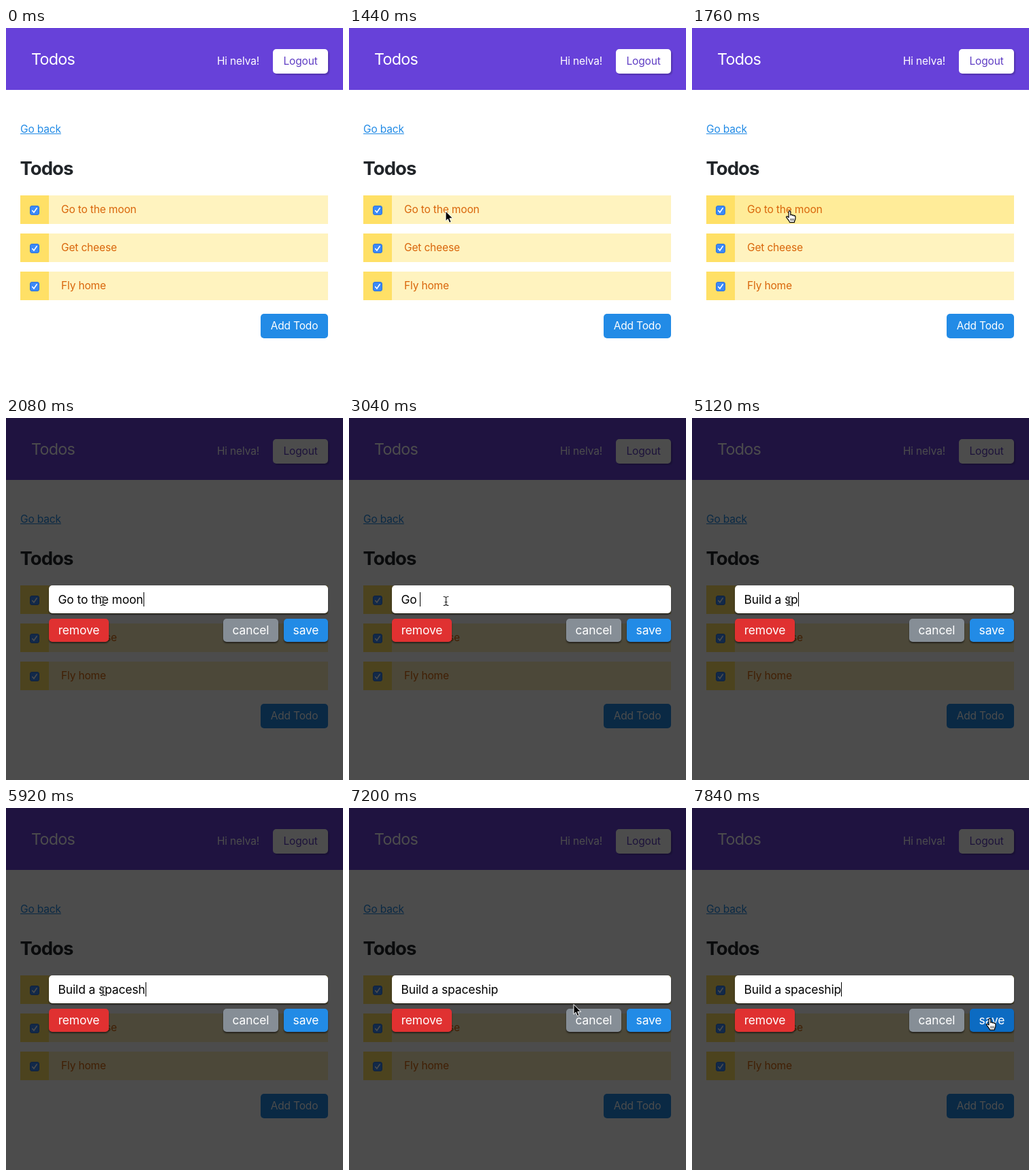
Animation, 495 px wide and 532 px high, one loop 8 s. Source, as an HTML page:

```html
<!DOCTYPE html>
<html lang="en">
<head>
<meta charset="utf-8">
<title>Todos</title>
<style>
  html, body { margin: 0; width: 100%; height: 100%; overflow: hidden; }
  body {
    position: relative; background: #fff; color: #212529;
    font: 15.5px Inter, sans-serif; font-optical-sizing: none;
    letter-spacing: -.01em; white-space: pre;
  }
  body > *, .row > *, #modal > * { position: absolute; box-sizing: border-box; }
  header { left: 0; top: 0; width: 100%; height: 91px; background: #6741d9; }
  .brand { left: 37px; top: 31px; font-size: 23.3px; line-height: 30px; letter-spacing: -.032em; color: #fff; }
  .greeting { right: 123px; top: 38px; line-height: 21px; color: #fff; }
  .button { border-radius: 5px; color: #fff; text-align: center; }
  .logout { left: 392px; top: 31px; width: 81px; height: 36px; line-height: 36px;
    background: #fff; color: #5f3dc4; box-shadow: 2px 2px 2px rgba(0,0,0,.2); }
  .add { left: 374px; top: 420px; width: 99px; height: 36px; line-height: 36px; background: #228be6; }
  .back { left: 21px; top: 138px; line-height: 21px; color: #228be6; text-decoration: underline; }
  h1 { left: 20.5px; top: 190px; margin: 0; font-size: 27.5px; line-height: 32px; letter-spacing: -.035em; }
  .row { left: 21px; width: 452px; height: 42px; line-height: 42px; color: #d9650a; }
  .fill { left: 42px; width: 410px; height: 42px; background: #fff3bf; }
  .cell { left: 0; width: 42px; height: 42px; background: #ffe066; }
  .check { left: 14px; top: 15px; width: 14px; height: 14px; }
  .label { left: 60px; top: 0; }
  .hover .fill { background: #ffec99; }

  #modal, #pointer { left: 0; top: 0; width: 100%; height: 100%; }
  #modal { background: rgba(0,0,0,.7); font-size: 17.4px; letter-spacing: -.006em; }
  #modal > * { border-radius: 5px; box-shadow: 0 2px 2px rgba(0,0,0,.5); }
  .input { left: 63px; top: 246px; width: 410px; height: 41px; padding-left: 13.5px;
    display: flex; align-items: center; background: #fff; color: #000; }
  #caret { width: 1px; height: 21px; background: #000; }
  #modal .button { top: 295px; height: 34px; line-height: 33px; }
  .remove { left: 63px; width: 88px; background: #e03131; }
  .cancel { left: 319px; width: 81px; background: #868e96; }
  #save { left: 408px; width: 65px; }
  #pointer g { stroke-linejoin: round; stroke-linecap: round; }
</style>
</head>
<body>
<header></header>
<div class="brand">Todos</div>
<div class="greeting">Hi nelva!</div>
<div class="button logout">Logout</div>
<div class="back">Go back</div>
<h1>Todos</h1>
<div class="button add">Add Todo</div>
<div id="modal"><div class="input"><span id="text"></span><i id="caret"></i></div><div class="button remove">remove</div><div class="button cancel">cancel</div><div class="button" id="save">save</div></div>
<svg id="pointer">
  <g id="arrow" fill="#000" stroke="#fff">
    <path d="M0 0V14.2L3.2 11.2 5.6 16.8 8.1 15.7 5.8 10.3H10.2Z"/>
  </g>
  <g id="hand" fill="#fff" stroke="#000" stroke-width="1.2">
    <path d="M4.5 10.5V2.2a1.4 1.4 0 0 1 2.8 0V7c.3-1.1 2.4-1 2.6.5 .4-.9 2.2-.7 2.4.6 .5-.7 2.1-.4 2.1 1.1V12c0 2-1.4 3-1.6 5.7H6C5.5 15 1.6 11.7 1 10 .6 8.4 2.8 8.2 4.5 10.5Z"/>
    <path d="M7.5 12.3v2.7M9.6 12.3v2.7M11.7 12.3v2.7" stroke-width=".8"/>
  </g>
  <g id="beam" fill="none">
    <path d="M-3.5-6.5Q0-6.5 0-4.5 0-6.5 3.5-6.5M0-4.5V4.5M-3.5 6.5Q0 6.5 0 4.5 0 6.5 3.5 6.5M-1.5 1.5H1.5" stroke="#fff" stroke-opacity=".7" stroke-width="2.4"/>
    <path d="M-3.5-6.5Q0-6.5 0-4.5 0-6.5 3.5-6.5M0-4.5V4.5M-3.5 6.5Q0 6.5 0 4.5 0 6.5 3.5 6.5M-1.5 1.5H1.5" stroke="#222" stroke-width="1.1"/>
  </g>
</svg>
<script>
const LOOP = 8000, STEP = 160, MODAL_OPENS = 2080;
const get = id => document.getElementById(id);

const rows = ['Go to the moon', 'Get cheese', 'Fly home'].map((label, i) => {
  const row = document.createElement('div');
  row.className = 'row';
  row.style.top = 246 + 56 * i + 'px';
  row.innerHTML = `<div class="fill"></div><div class="cell"></div>
    <svg class="check" viewBox="0 0 14 14"><rect x=".5" y=".5" width="13" height="13" rx="2.5" fill="#3b8af7" stroke="#2f72d8"/>
    <path d="M3.8 7.4 6 10 10.2 3.8" fill="none" stroke="#fff" stroke-width="1.6" stroke-linecap="round"/></svg>
    <div class="label">${label}</div>`.replace(/>\s+</g, '><');
  document.body.insertBefore(row, get('modal'));
  return row;
});

// [time, shape, x, y]
const pointerKeys = [
  [0, null, 0, 0],
  [320, 'arrow', 484, 466],
  [480, 'arrow', 369, 400],
  [800, 'arrow', 250, 291],
  [960, 'arrow', 110, 190],
  [1120, 'arrow', 29, 147],
  [1280, 'arrow', 68, 152],
  [1440, 'arrow', 142, 269.5],
  [1760, 'hand', 137.5, 268],
  [MODAL_OPENS, 'beam', 142.5, 269],
  [7040, 'beam', 190, 276],
  [7200, 'arrow', 330, 289],
  [7360, 'arrow', 436, 310],
  [7680, 'hand', 431.5, 308.5]
];

// [time, text, caret hidden]
const first = 'Go to the moon', second = 'Build a spaceship';
const edits = (time, text, lengths) => lengths.map((n, i) => [time + STEP * i, text.slice(0, n)]);
const textKeys = [
  [0, first],
  ...edits(2560, first, [13, 10, 6, 3, 0]),
  ...edits(3680, second, [1, 2, 3, 4, 5, 6, 7]),
  ...edits(4960, second, [8, 10, 11, 13]),
  ...edits(5760, second, [14, 15]),
  [6400, second.slice(0, 15), true],
  [6720, second],
  [7200, second, true],
  [7680, second]
];

const latest = (keys, t) => keys.filter(key => key[0] <= t).pop();

function draw(now) {
  const t = now % LOOP;
  get('modal').style.display = t < MODAL_OPENS ? 'none' : 'block';
  rows[0].classList.toggle('hover', t >= 1760);

  const [, text, caretHidden] = latest(textKeys, t);
  get('text').textContent = text;
  get('caret').style.opacity = caretHidden ? 0 : 1;
  get('save').style.background = t < 7680 ? '#228be6' : t < 7840 ? '#177bd4' : '#0c6bc2';

  const [, shape, x, y] = latest(pointerKeys, t);
  for (const name of ['arrow', 'hand', 'beam']) {
    get(name).style.display = name === shape ? '' : 'none';
    get(name).setAttribute('transform', `translate(${x} ${y})`);
  }
}

const start = performance.now();
(function tick() {
  draw(performance.now() - start);
  requestAnimationFrame(tick);
})();
</script>
</body>
</html>
```
